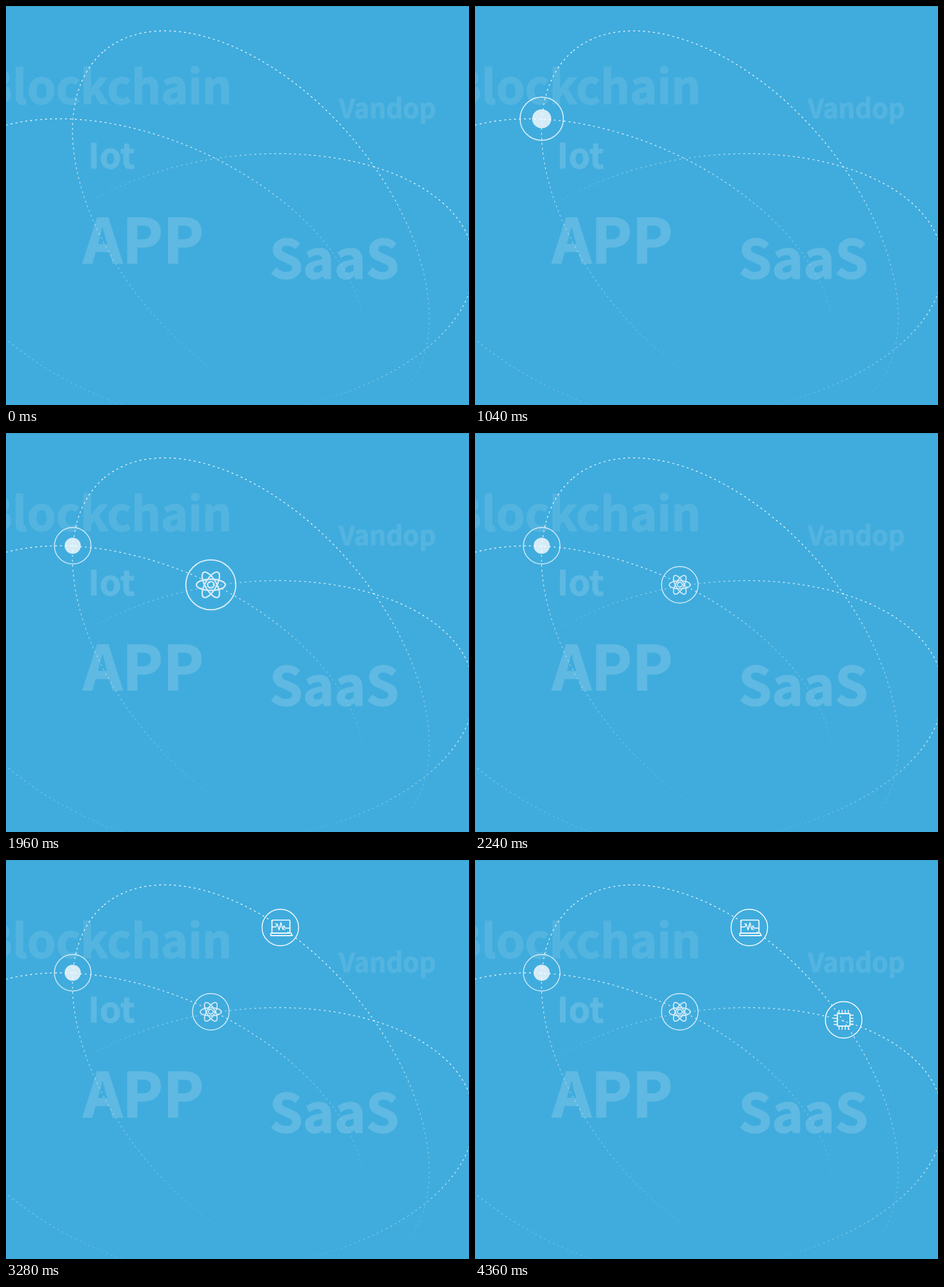
Animation of 746x644 px, one loop 4.44 s. Source, as an HTML page:

```html
<!DOCTYPE html>
<html lang="en">
<head>
<meta charset="utf-8">
<title>Orbits</title>
<style>
  html, body { margin: 0; width: 100%; height: 100%; overflow: hidden; background: #40acdd; }
  svg { display: block; width: 746px; height: 644px; }
  text {
    font-family: "Noto Sans CJK SC", "Noto Sans CJK JP", "Noto Sans", sans-serif;
    font-weight: 700; fill: #fff; stroke: #fff; stroke-width: .018em;
  }
  .orbits { fill: none; stroke-width: 1.2; stroke-dasharray: 3 5; }
  .icon { fill: none; stroke: #fff; stroke-width: 1.7; stroke-linejoin: round; visibility: hidden; }
  .ring { stroke-width: 1.4; }
  .soft { opacity: .78; }
</style>
</head>
<body>
<svg viewBox="0 0 746 644">
  <defs>
    <linearGradient id="fadeA" gradientUnits="userSpaceOnUse" x1="420" y1="120" x2="370" y2="650">
      <stop stop-color="#fff"/>
      <stop offset=".25" stop-color="#fff" stop-opacity=".85"/>
      <stop offset=".45" stop-color="#fff" stop-opacity=".5"/>
      <stop offset=".7" stop-color="#fff" stop-opacity=".28"/>
      <stop offset=".95" stop-color="#fff" stop-opacity="0"/>
    </linearGradient>
    <linearGradient id="fadeB" gradientUnits="userSpaceOnUse" x1="100" y1="180" x2="300" y2="640">
      <stop stop-color="#fff"/>
      <stop offset=".3" stop-color="#fff" stop-opacity=".8"/>
      <stop offset=".5" stop-color="#fff" stop-opacity=".6"/>
      <stop offset=".6" stop-color="#fff" stop-opacity=".35"/>
      <stop offset=".9" stop-color="#fff" stop-opacity=".15"/>
      <stop offset="1.0" stop-color="#fff" stop-opacity="0"/>
    </linearGradient>
    <linearGradient id="fadeC" gradientUnits="userSpaceOnUse" x1="720" y1="300" x2="397" y2="640">
      <stop stop-color="#fff"/>
      <stop offset=".3" stop-color="#fff" stop-opacity=".8"/>
      <stop offset=".45" stop-color="#fff" stop-opacity=".45"/>
      <stop offset=".65" stop-color="#fff" stop-opacity=".35"/>
      <stop offset=".8" stop-color="#fff" stop-opacity=".12"/>
      <stop offset="1" stop-color="#fff" stop-opacity="0"/>
    </linearGradient>
  </defs>

  <rect width="746" height="644" fill="#40acdd"/>
  <rect width="746" height="1" fill="#3a9bc8"/>

  <text x="364" y="157.5" font-size="74.5" text-anchor="end" opacity=".1">Blockchain</text>
  <text x="614.5" y="181" font-size="42" text-anchor="middle" opacity=".1">Vandop</text>
  <text x="170" y="261.5" font-size="56" text-anchor="middle" opacity=".15">Iot</text>
  <text x="221.5" y="414.5" font-size="98.5" text-anchor="middle" opacity=".16">APP</text>
  <text x="529" y="440" font-size="86" text-anchor="middle" opacity=".16">SaaS</text>

  <g class="orbits">
    <path id="orbitA" stroke="url(#fadeA)"/>
    <path id="orbitB" stroke="url(#fadeB)"/>
    <path id="orbitC" stroke="url(#fadeC)"/>
  </g>

  <g class="icon soft" id="chat">
    <circle class="ring" r="29.5"/>
    <circle r="13" fill="#fff" stroke="none"/>
  </g>
  <g class="icon soft" id="atom">
    <circle class="ring" r="29.5"/>
    <ellipse rx="17" ry="6.6"/>
    <ellipse rx="17" ry="6.6" transform="rotate(60)"/>
    <ellipse rx="17" ry="6.6" transform="rotate(120)"/>
    <circle r="3.8"/>
  </g>
  <g class="icon" id="laptop">
    <circle class="ring" r="29.5"/>
    <rect x="-13.5" y="-12" width="29" height="21" rx="1.5"/>
    <rect x="-15.5" y="9" width="33.5" height="4.2" rx="1"/>
    <path d="M-13-1h6l2-5 3 10 3-12 3 11 2-6 2 4h7" stroke-width="1.3"/>
  </g>
  <g class="icon" id="chip">
    <circle class="ring" r="29.5"/>
    <rect x="-10.2" y="-10.2" width="20.4" height="20.4" rx="1.5"/>
    <path id="pins" stroke-width="1.4"/>
  </g>
</svg>
<script>
  const LOOP = 4440, STEP = 40, TRAVEL = 600, GROW = 240, SHRINK = 160, PEAK = 0.73;
  const $ = id => document.getElementById(id);

  // Paths rather than transformed ellipses keep the gradients in stage space.
  function orbit(id, cx, cy, rx, ry, deg) {
    const a = deg * Math.PI / 180, dx = rx * Math.cos(a), dy = rx * Math.sin(a);
    const arc = `A${rx} ${ry} ${deg} 0 1 `;
    $(id).setAttribute('d', `M${cx - dx} ${cy - dy}${arc}${cx + dx} ${cy + dy}${arc}${cx - dx} ${cy - dy}`);
  }
  orbit('orbitA', 394.5, 352, 366, 214.5, 49.8);
  orbit('orbitB', 227, 430, 372, 213.5, 24.45);
  orbit('orbitC', 385, 449.5, 371, 208, -6.9);

  $('pins').setAttribute('d', [-7.5, -2.5, 2.5, 7.5].map(p =>
    `M${p}-11v-5M${p} 11v5M-11 ${p}h-5M11 ${p}h5`).join(''));

  // from, to and the starting velocity per trip
  const icons = [
    { el: $('chat'), start: 80, from: [700, 140], to: [107.5, 182], v: [-592.5, 54] },
    { el: $('atom'), start: 1240, from: [-9, 353], to: [330, 245], v: [339, -108] },
    { el: $('laptop'), start: 2280, from: [281, 553], to: [442, 109], v: [-30, -354] },
    { el: $('chip'), start: 3360, from: [831, 56], to: [594, 258], v: [-237, 202] }
  ];

  function pulse(ms) {
    if (ms <= 0 || ms >= GROW + SHRINK) return 1;
    return 1 + PEAK * (ms < GROW ? ms / GROW : (GROW + SHRINK - ms) / SHRINK);
  }

  function draw() {
    const t = Math.floor(performance.now() % LOOP / STEP) * STEP;
    for (const { el, start, from, to, v } of icons) {
      const age = t - start, u = Math.min(Math.max(age / TRAVEL, 0), 1);
      const [x, y] = from.map((p, i) => p + v[i] * u + (to[i] - p - v[i]) * u * u);
      el.style.visibility = age < 0 ? 'hidden' : 'visible';
      el.setAttribute('transform', `translate(${x} ${y}) scale(${pulse(age - TRAVEL)})`);
    }
    requestAnimationFrame(draw);
  }
  draw();
</script>
</body>
</html>
```
